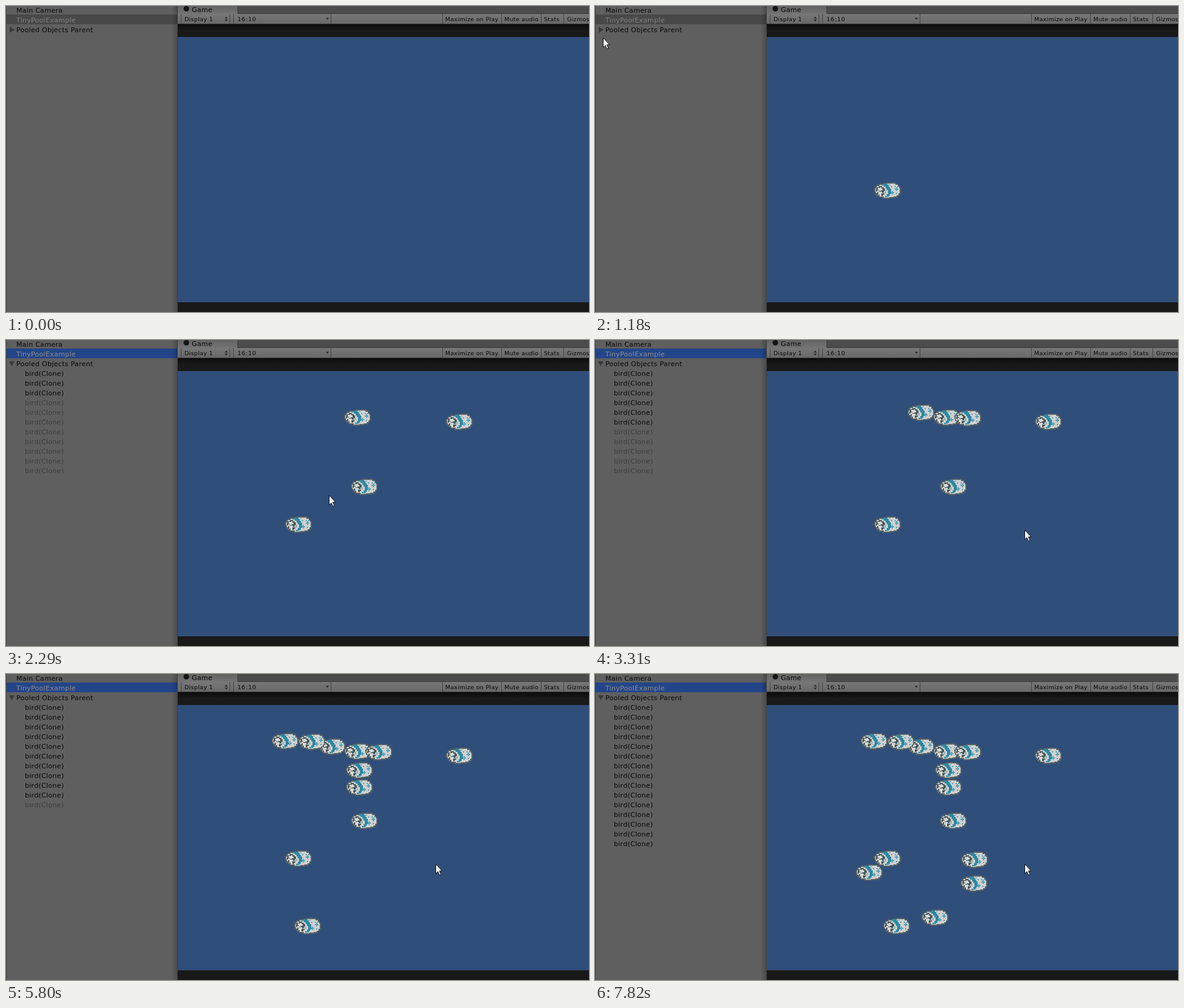
Animation, 957 px wide and 503 px high, one loop 8000 ms. Source, as an HTML page:

```html
<!DOCTYPE html>
<html lang="en">
<head>
<meta charset="utf-8">
<title>Object pool</title>
<style>
html, body { margin: 0; width: 100%; height: 100%; overflow: hidden; background: #191919; }
svg { display: block; }
text { font: 11px "DejaVu Sans", sans-serif; letter-spacing: .28px; fill: #080808; }
.bar text { font-size: 9.5px; letter-spacing: .3px; }
</style>
</head>
<body>
<svg id="stage" width="957" height="503" viewBox="0 0 957 503">
  <defs>
    <linearGradient id="barFill" x2="0" y2="1">
      <stop stop-color="#777"/><stop offset="1" stop-color="#686868"/>
    </linearGradient>
    <linearGradient id="tabFill" x2="0" y2="1">
      <stop stop-color="#626262"/><stop offset="1" stop-color="#747474"/>
    </linearGradient>
    <linearGradient id="topShade" x2="0" y2="1">
      <stop stop-color="#0c0c0c"/><stop offset=".5" stop-color="#191919"/>
    </linearGradient>
    <linearGradient id="edge">
      <stop stop-color="#000" stop-opacity="0"/><stop offset="1" stop-color="#000" stop-opacity=".25"/>
    </linearGradient>
    <g id="bird" shape-rendering="crispEdges">
      <path fill="#586465" d="M4 4H8V2H16V1H20V0H36V2H40V5H42V8H44V19H42V22H39V25H34V26H26V27H14V25H8V23H5V21H3V18H1V15H0V9H2V6H4Z"/>
      <path fill="#d0d0d0" d="M5 6H9V4H17V3H22V2H35V4H39V7H41V9H42V18H40V21H37V23H32V24H25V25H16V23H9V21H6V18H4V15H2V10H4V7H5Z"/>
      <path fill="#2b88a2" d="M15 2H22V4H24V7H26V10H28V19H26V22H24V24H18V22H21V19H23V13H21V10H19V7H16V5H15Z"/>
      <path fill="#465657" d="M4 8H8V6H13V8H16V10H18V14H16V17H13V15H8V13H5V15H3V11H4Z"/>
      <path fill="#dadada" d="M6 9H10V8H12V10H14V13H11V14H8V12H6ZM3 15H5V17H3ZM9 17H12V20H9Z"/>
      <path fill="#465657" d="M5 16H7V20H9V22H7V20H5ZM12 18H17V20H15V22H12Z"/>
      <path fill="#91b6be" d="M17 14H20V18H17ZM24 3H27V5H24ZM12 4H15V6H12Z"/>
      <path fill="#55a3b6" d="M34 6H36V8H38V6H40V8H38V10H40V12H38V14H36V12H34V10H36V8H34ZM29 14H31V16H33V18H31V20H29V18H28V16H29ZM28 6H30V8H28ZM36 17H38V19H36ZM21 22H23V24H21Z"/>
    </g>
  </defs>

  <rect width="282" height="503" fill="#5f5f5f"/>
  <rect id="select" x="1" y="14" width="281" height="16"/>
  <g id="tree"></g>
  <path id="fold" fill="#3a3a3a"/>
  <rect x="272" width="10" height="503" fill="url(#edge)"/>
  <path d="M.5 0V503M281.5 0V503" stroke="#404040"/>

  <rect x="282" width="675" height="13" fill="#4c4c4c"/>
  <rect x="282" width="98" height="13" fill="url(#tabFill)"/>
  <path d="M380.5 0V12.5H957" fill="none" stroke="#393939"/>
  <circle cx="296" cy="4.5" r="4.5" fill="#151515"/>
  <text x="305" y="10">Game</text>
  <rect x="282" y="13" width="675" height="17" fill="url(#barFill)"/>
  <path d="M282 29.5H957" stroke="#333"/>
  <g class="bar" id="bar"></g>
  <path d="M359 20.5L361.5 17.5L364 20.5ZM359 22.5L361.5 25.5L364 22.5ZM525 19.5H530L527.5 22.5Z" fill="#222"/>

  <rect x="282" y="30" width="675" height="21" fill="url(#topShade)"/>
  <rect x="282" y="51" width="675" height="436" fill="#304e7a"/>
  <rect x="282" y="487" width="675" height="16" fill="#191919"/>
  <g id="flock"></g>
  <path id="cursor" d="M.5 .5V16L4 12.7L6.6 18.5L9 17.5L6.5 11.7H11Z" fill="#fff" stroke="#111"/>
</svg>
<script>
const LOOP = 8000, ENTER = 300, OPEN = 1340, LEAVE = 1810;
const $ = id => document.getElementById(id);

function add(parent, tag, attrs, label) {
  const el = document.createElementNS("http://www.w3.org/2000/svg", tag);
  for (const key in attrs) el.setAttribute(key, attrs[key]);
  if (label) el.textContent = label;
  parent.append(el);
  return el;
}

// x, y, time on screen, time the list row lights up
const spawns = [
  [458, 290, 787, 787], [555, 114, 1340, 1340], [722, 121, 1810, 1890],
  [566, 228, 2290, 2370], [513, 106, 2770, 2850], [590, 115, 3310, 3310],
  [473, 401, 3780, 3930], [558, 145, 4310, 4390], [558, 173, 4780, 4860],
  [436, 97, 5330, 5410], [480, 98, 5800, 5880], [428, 313, 6350, 6350],
  [536, 387, 6810, 6970], [601, 292, 7280, 7430], [600, 331, 7820, 7820]
];
const POOLED = 11;

const tree = $("tree");
add(tree, "text", { x: 17, y: 11 }, "Main Camera");
const picked = add(tree, "text", { x: 17, y: 27 }, "TinyPoolExample");
add(tree, "text", { x: 17, y: 43 }, "Pooled Objects Parent");
const rows = spawns.map((s, i) => add(tree, "text", { x: 31, y: 59 + 16 * i }, "bird(Clone)"));
const birds = spawns.map(([x, y]) => add($("flock"), "use", { href: "#bird", x, y }));

const bar = $("bar");
for (const x of [287, 367, 373, 533, 716, 813, 878, 915])
  add(bar, "path", { d: `M${x + .5} 13V29`, stroke: "#444" });
for (const [x, label] of [[293, "Display 1"], [721, "Maximize on Play"],
  [818, "Mute audio"], [883, "Stats"], [921, "Gizmos"]])
  add(bar, "text", { x, y: 25 }, label);
add(bar, "text", { x: 380, y: 25, style: "letter-spacing:.7px" }, "16:10");

const show = (el, on) => el.setAttribute("visibility", on ? "visible" : "hidden");
const smooth = u => u * u * (3 - 2 * u);
const lerp = (a, b, u) => a + (b - a) * u;

// The pointer is sampled about every 80 ms.
function pointer(t) {
  if (t < 1110) {
    const u = Math.min(9, Math.floor((t - ENTER) / 81)) / 9;
    const s = 1 - (1 - u) ** 1.35;
    return [lerp(725, 21, s), lerp(486, 62, s) + 22 * Math.sin(Math.PI * s)];
  }
  if (t < 1260) return [13, 52];
  if (t < LEAVE) return [11, 42];
  const u = Math.min(11, Math.floor((t - LEAVE) / 80) + 1) / 11;
  const s = smooth(u ** .88);
  return [lerp(11, 705, s), lerp(42, 312, s) + 16 * Math.sin(Math.PI * s)];
}

function draw(t) {
  const open = t >= OPEN;
  $("select").setAttribute("fill", open ? "#23458a" : "#484848");
  picked.style.fill = open ? "#918f88" : "#828282";
  $("fold").setAttribute("d", open ? "M5 35H14L9.5 43Z" : "M6 34V44L14 39Z");
  spawns.forEach(([, , born, lit], i) => {
    show(birds[i], t >= born);
    show(rows[i], open && (i < POOLED || t >= lit));
    rows[i].style.fill = t >= lit ? "#080808" : "#3d3d3d";
  });
  show($("cursor"), t >= ENTER);
  const [x, y] = pointer(Math.max(t, ENTER)).map(Math.round);
  $("cursor").setAttribute("transform", `translate(${x} ${y})`);
}

function tick() {
  draw(performance.now() % LOOP);
  requestAnimationFrame(tick);
}
tick();
</script>
</body>
</html>
```
